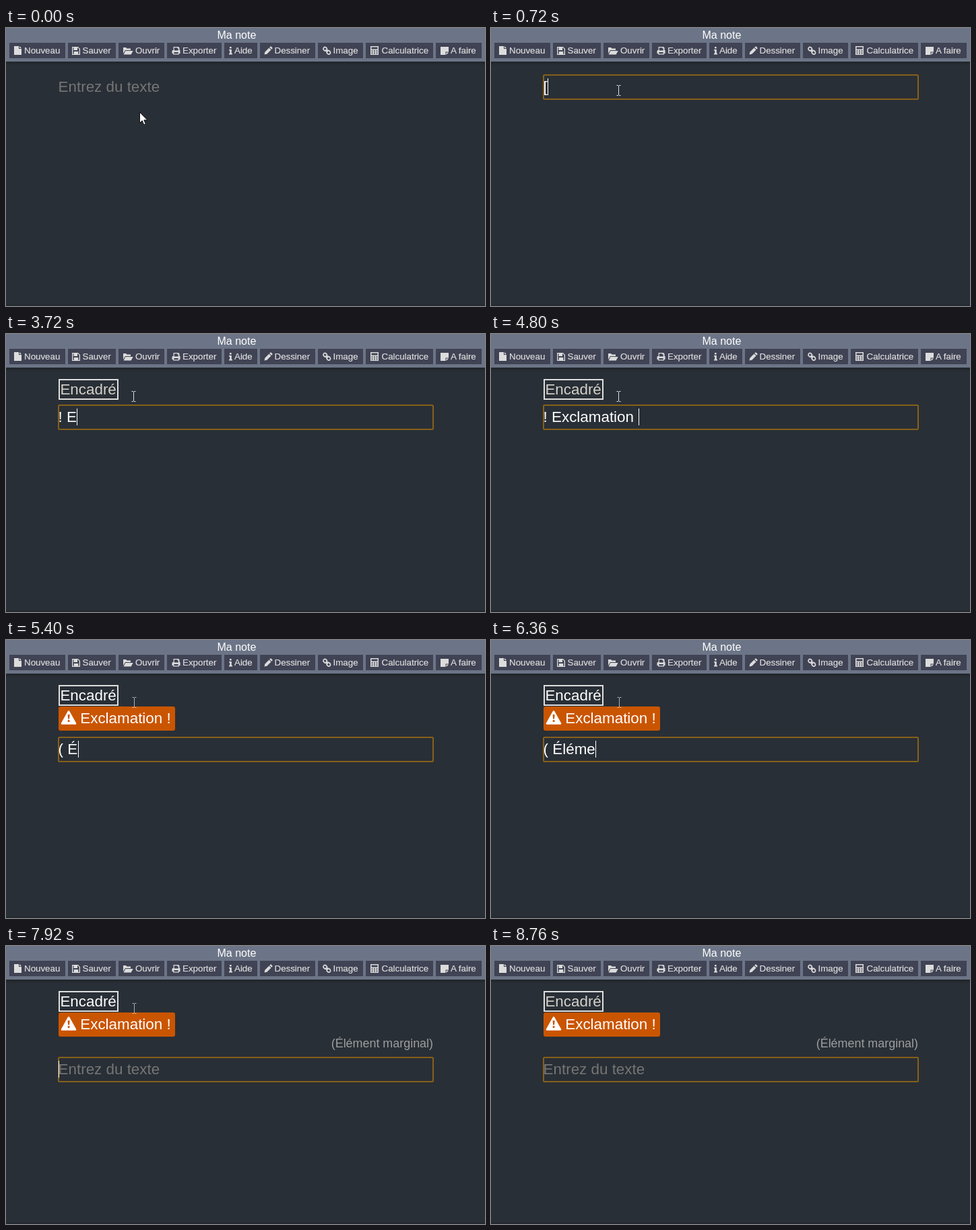
Animation of 711 by 414 pixels, one loop 8.88 s. Source, as an HTML page:

```html
<!DOCTYPE html>
<html lang="fr">
<head>
<meta charset="utf-8">
<title>Ma note</title>
<style>
  html, body { margin: 0; width: 100%; height: 100%; overflow: hidden; background: #292f36; }
  svg { display: block; width: 711px; height: 414px; }
  text { font-family: "Liberation Sans", Arial, sans-serif; font-size: 22.4px; fill: #fff; white-space: pre; }
  .title { font-size: 16px; }
  .label { font-size: 13.333px; fill: #dcdcdc; stroke: #dcdcdc; stroke-width: .2px; }
  .icon { fill: #dcdcdc; fill-rule: evenodd; }
  .icon.line { fill: none; stroke: #dcdcdc; stroke-width: 1.7px; }
  .hint { fill: #757575; }
  .aside { font-size: 17.92px; fill: #9c9e9f; text-anchor: end; }
  .ring { fill: none; stroke: #86601b; stroke-width: 2px; }
  .beam { fill: none; stroke: #dcdcdc; }
</style>
</head>
<body>
<svg viewBox="0 0 711 414">
  <defs>
    <linearGradient id="shade" x2="0" y2="1">
      <stop stop-color="#000" stop-opacity=".22"/>
      <stop offset="1" stop-color="#000" stop-opacity="0"/>
    </linearGradient>
  </defs>
  <rect width="711" height="414" fill="#292f36"/>
  <rect y="412" width="711" height="2" fill="#24292f"/>
  <rect y="50" width="711" height="6" fill="url(#shade)"/>
  <rect width="711" height="50" fill="#6c7587"/>
  <text class="title" x="313.5" y="16">Ma note</text>
  <g id="toolbar"></g>

  <g id="framed">
    <rect x="79" y="68" width="87" height="29" fill="none" stroke="#dedede" stroke-width="2"/>
    <text id="framedText" x="80.4" y="90">Encadré</text>
  </g>
  <g id="alert">
    <rect x="78" y="99" width="173" height="36" rx="3" fill="#ca5500"/>
    <path d="M93 106.5L103 124.5H83z" fill="#fff" stroke="#fff" stroke-width="2.6" stroke-linejoin="round"/>
    <path d="M91.6 111h3l-.5 6.5h-2z" fill="#ca5500"/>
    <circle cx="93.1" cy="120.6" r="1.6" fill="#ca5500"/>
    <text x="110.3" y="124">Exclamation !</text>
  </g>
  <text id="margin" class="aside" x="634" y="151">(Élément marginal)</text>

  <g id="editor">
    <rect id="ring" class="ring" x="78" y="70" width="556" height="36" rx="1.5"/>
    <text id="hint" class="hint" x="77.6" y="95">Entrez du texte</text>
    <text id="typed" x="77.6" y="95"></text>
    <rect id="caret" y="75" width="1" height="25" fill="#fff"/>
  </g>

  <path id="arrow" d="M.5.5v16l3.7-3.6 2.5 6.3 2.6-1.1-2.5-6h5z" fill="#fff" stroke="#111"/>
  <path id="beam" class="beam" d="M-3 .5h2.5M.5.5H3M0 1v14M-3 15.5h2.5M.5 15.5H3" transform="translate(189.5 85)"/>
</svg>
<script>
const LOOP = 8880;
const $ = id => document.getElementById(id);

// Toolbar: left, right, icon x, label x, label, icon path
let keys = 'M0 0h12v13H0zM1.5 1.5v3h9v-3z';
for (let i = 0; i < 9; i++) keys += `M${1.5 + 3.5 * (i % 3)} ${6 + 2.2 * Math.floor(i / 3)}h2v1.3h-2z`;
const buttons = [
  [5, 88, 12, 27, 'Nouveau', 'M0 0h7v4h4v9H0zM8 0l3 3H8z'],
  [92, 163, 98, 113.5, 'Sauver', 'M0 1h9l3 3v9H0zM1.3 2.3v9.4h1.5V8h6.4v3.7h1.5V4.5L8.6 2.3H8V6H2.5V2.3z'],
  [167, 235, 174, 192, 'Ouvrir', 'M0 2h4l1.5 1.5H11V6H3L0 11zM3.4 7h11.2l-3 5.5H.6z'],
  [239, 320, 246.5, 262, 'Exporter', 'M2 1h7.5L11 2.5V6h1v5h-1.5v1.5h-9V11H0V7l1-1h1zM3.2 2.2v4.3h6v-3H8V2.2zM2.8 9v2.3h6.4V9z'],
  [324, 373, 331, 339, 'Aide', 'M1 1h2.6v2.6H1zM0 5h3.8v5.8H5v1.7H0v-1.7h1.2V6.6H0z'],
  [377, 459, 383.5, 398.5, 'Dessiner', 'M0 12.5l.8-3.8L7 2.5l3 3-6.2 6.2zM7.7 1.8L9 .5h1l2 2v1l-1.3 1.3z'],
  [463, 530, 470, 485.5, 'Image', 'M1.4 5.2a2.4 2.4 0 0 1 3.2-3.4l1.6 1.6a2.4 2.4 0 0 1-3.2 3.4zM6.4 10.2a2.4 2.4 0 0 1 3.2-3.4l1.6 1.6a2.4 2.4 0 0 1-3.2 3.4zM4.6 5.2L8 8.4', 'line'],
  [534, 634, 541, 557.5, 'Calculatrice', keys],
  [638, 706, 645, 660, 'A faire', 'M0 1h12v7.5H7.5V13H0zM8.5 9.5H12L8.5 13z']
];
$('toolbar').innerHTML = buttons.map(([left, right, iconX, labelX, label, icon, kind = '']) =>
  `<rect x="${left}" y="22" width="${right - left}" height="23" fill="#404354"/>
   <path class="icon ${kind}" d="${icon}" transform="translate(${iconX} 27)"/>
   <text class="label" x="${labelX}" y="38">${label}</text>`).join('');

// Editor content: time, text, caret visible
const typing = [[0, '', 0], [240, '', 1], [480, '', 0], [720, '[', 1], [840, '[ ', 1], [1080, '[ En', 1]];
const type = (start, chunks) => {
  let text = typing[typing.length - 1][1];
  chunks.split('|').forEach((chunk, i) => typing.push([start + i * 120, text += chunk, 1]));
};
type(1440, 'ca|d|r|é');
typing.push([2040, '', 1], [2400, '', 0], [2640, '', 1], [2880, '! ', 1], [3240, '! ', 0], [3480, '! ', 1]);
type(3720, 'E|xc|l|am|a|t|io|n');
type(4800, ' |!');
typing.push([5160, '', 1], [5400, '( É', 1], [5760, '( É', 0]);
type(6000, 'l|é|m|e|n|t| |m|a|r|g|in|a|l');
typing.push([7920, '', 1], [8160, '', 0], [8400, '', 1], [8760, '', 0]);

// Editor offset grows with each finished line
const lines = [[0, 0], [2040, 36], [5160, 75], [7920, 96]];

// Pointer: time, shape, x, y
const pointer = [
  [0, 'arrow', 198, 125], [120, 'beam', 189.5, 85], [5400, 'beam', 190.5, 85],
  [8160, 'arrow', 262, 59], [8280, 'arrow', 325, 210], [8400, 'arrow', 374, 362], [8520, 'none', 0, 0]
];

const at = (steps, t) => steps.filter(step => step[0] <= t).pop();
const show = (id, on) => { $(id).style.display = on ? '' : 'none'; };

function draw(t) {
  const [, text, caretOn] = at(typing, t);
  const [, shape, x, y] = at(pointer, t);
  const hovered = t >= 5400 && t < 8160;

  show('framed', t >= 2040);
  show('alert', t >= 5160);
  show('margin', t >= 7920);
  $('framedText').style.fill = hovered ? '#fff' : '#d3d2ca';

  $('editor').setAttribute('transform', `translate(0 ${at(lines, t)[1]})`);
  show('ring', t >= 240);
  show('hint', !text);
  $('typed').textContent = text;
  show('caret', caretOn);
  $('caret').setAttribute('x', Math.round(78 + (text ? $('typed').getComputedTextLength() : 0)));

  for (const id of ['arrow', 'beam']) {
    show(id, id === shape);
    if (id === shape) $(id).setAttribute('transform', `translate(${x} ${y})`);
  }
  $('beam').style.opacity = hovered ? .75 : 1;
}

const start = performance.now();
function tick() {
  draw((performance.now() - start) % LOOP);
  requestAnimationFrame(tick);
}
tick();
</script>
</body>
</html>
```
